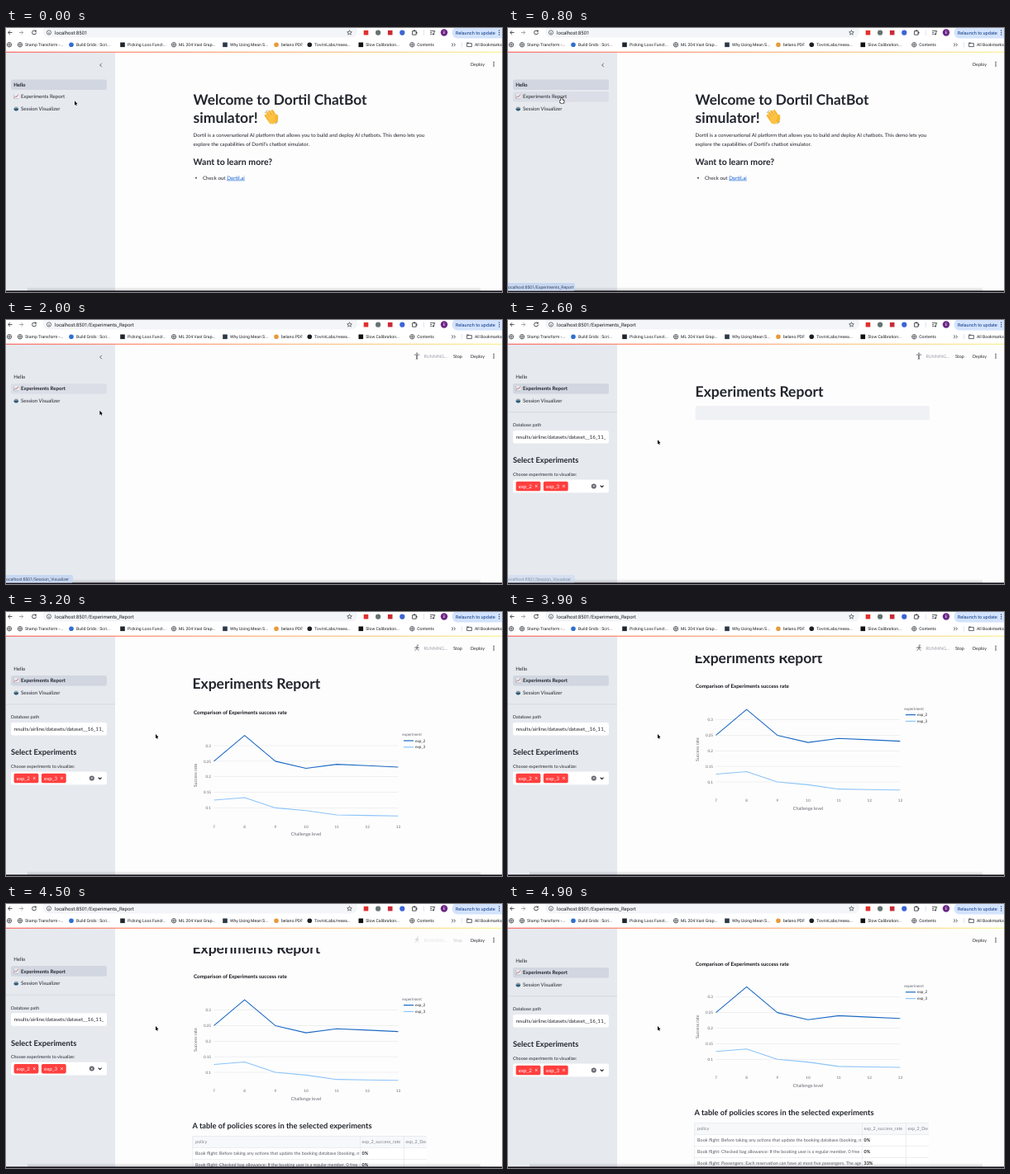
These frames come from a looping animation (600x320 px, 5000 ms). An HTML page with a canvas:

```html
<!DOCTYPE html>
<html lang="en">
<head>
<meta charset="utf-8">
<title>Chatbot simulator demo</title>
<style>
html, body { margin: 0; width: 100%; height: 100%; overflow: hidden; background: #fff; }
canvas { display: block; width: 600px; height: 320px; }
</style>
</head>
<body>
<canvas id="stage"></canvas>
<script>
const LOOP = 5000, STEP = 100;
const INK = '#23252e', DARK = '#3c4046', SOFT = '#62656f', SIDE = '#e6eaef';
const APP = 'Lato, "Open Sans", sans-serif';
const CHROME = 'Roboto, Inter, sans-serif';
const SIDE_W = 132;

const canvas = document.getElementById('stage');
const dpr = window.devicePixelRatio || 1;
canvas.width = 600 * dpr;
canvas.height = 320 * dpr;
const c = canvas.getContext('2d');
c.textRendering = 'geometricPrecision';
c.lineJoin = 'round';

// Smooth progress from 0 to 1 between two times
function ease(t, from, to) {
  const p = Math.min(1, Math.max(0, (t - from) / (to - from)));
  return p * p * (3 - 2 * p);
}

// Text is placed by the middle of its capitals
function text(s, x, cy, size, { color = INK, bold = false, font = APP, align = 'left' } = {}) {
  c.font = `${bold ? 700 : 400} ${size}px ${font}`;
  c.textAlign = align;
  c.fillStyle = color;
  c.fillText(s, x, cy + size * 0.36);
  return c.measureText(s).width;
}

function rect(x, y, w, h, color) {
  c.fillStyle = color;
  c.fillRect(x, y, w, h);
}

function pill(x, y, w, h, r, color) {
  c.beginPath();
  c.roundRect(x, y, w, h, r);
  c.fillStyle = color;
  c.fill();
}

function dot(x, y, r, color) {
  pill(x - r, y - r, 2 * r, 2 * r, r, color);
}

function stroke(color, width) {
  c.lineWidth = width;
  c.strokeStyle = color;
  c.stroke();
}

function ring(x, y, r, color, width = 0.8, end = Math.PI * 2) {
  c.beginPath();
  c.arc(x, y, r, 0, end);
  stroke(color, width);
}

function line(color, width, ...pts) {
  c.beginPath();
  pts.forEach(([x, y]) => c.lineTo(x, y));
  stroke(color, width);
}

function chevron(x, y, r, angle, color = DARK, width = 0.9) {
  const arm = a => [x - r * 1.4 * Math.cos(angle + a), y - r * 1.4 * Math.sin(angle + a)];
  line(color, width, arm(Math.PI / 4), [x, y], arm(-Math.PI / 4));
}

function cross(x, y, r, color) {
  line(color, 0.8, [x - r, y - r], [x + r, y + r]);
  line(color, 0.8, [x + r, y - r], [x - r, y + r]);
}

function clipped(x, y, w, h, draw) {
  c.save();
  c.beginPath();
  c.rect(x, y, w, h);
  c.clip();
  draw();
  c.restore();
}

function faded(alpha, draw) {
  c.save();
  c.globalAlpha = alpha;
  draw();
  c.restore();
}

function globe(x, y) {
  ring(x, y, 2.7, DARK);
  line(DARK, 0.7, [x - 2.6, y], [x + 2.6, y]);
  line(DARK, 0.7, [x, y - 2.6], [x, y + 2.6]);
}

function square(x, y, color) {
  rect(x - 2.8, y - 2.8, 5.6, 5.6, color);
}

function star(x, y, r) {
  c.beginPath();
  for (let i = 0; i < 10; i++) {
    const a = i * Math.PI / 5 - Math.PI / 2, q = i % 2 ? r * 0.45 : r;
    c.lineTo(x + q * Math.cos(a), y + q * Math.sin(a));
  }
  c.closePath();
  stroke(DARK, 0.7);
}

const bookmarks = [
  ['Stamp Transform -...', globe], ['Build Grids : Scri...', dot, '#2f6fd0'],
  ['Picking Loss Funct...', square, '#20262e'], ['ML 204 Vast Grap...', globe],
  ['Why Using Mean S...', square, '#2d3a48'], ['belano.PDF', dot, '#e79b3a'],
  ['TovrinLabs/resea...', dot, '#1c1f24'], ['Slow Calibration...', square, '#111'],
  ['Contents', globe]
];

function toolbar(clicked) {
  const ui = { font: CHROME, color: '#1d1f23' }, y = 5.5, row = 20.3;
  rect(0, 0, 600, 29, '#fff');
  line(DARK, 0.9, [7.5, y], [2.8, y]);
  chevron(2.7, y, 2.3, Math.PI);
  line('#9a9da2', 0.9, [16, y], [20.7, y]);
  chevron(20.8, y, 2.3, 0, '#9a9da2');
  ring(34, y, 2.4, DARK, 0.9, Math.PI * 1.7);
  rect(34.8, 2.7, 2, 1.8, DARK);

  pill(45, -3, 380, 14.5, 7, '#f3f5f9');
  ring(52, y, 2.6, DARK, 0.7);
  line(DARK, 0.8, [52, 5], [52, 7]);
  text('localhost:8501' + (clicked ? '/Experiments_Report' : ''), 59, 5.6, 6, ui);
  star(415.5, 5.7, 3);

  ['#e0312c', '#65736f', '#c92a35', '#3d63d6'].forEach((color, i) =>
    (i % 2 ? dot : square)(435.5 + i * 14.6, 5.7, i % 2 ? 3.1 : color, color));
  c.strokeStyle = DARK;
  c.lineWidth = 0.9;
  c.strokeRect(491.6, 3.6, 4.6, 4.6);
  dot(494, 3.2, 1, DARK);
  dot(496.6, 5.8, 1, DARK);
  [3.4, 5.4, 7.4].forEach((my, i) => line(DARK, 0.8, [513, my], [i ? 515.5 : 518.5, my]));
  dot(517, 7.4, 1, DARK);
  line(DARK, 0.8, [517.8, 7.4], [517.8, 4], [519.3, 4]);
  dot(530, y, 4.2, '#6b2687');
  text('E', 530, 5.6, 4.6, { font: CHROME, color: '#fff', align: 'center' });
  pill(539.5, -1, 66, 13.5, 6.5, '#d3e3fd');
  text('Relaunch to update', 543.8, 5.7, 5.6, { font: CHROME, color: '#0f3a86' });
  [3, 5.5, 8].forEach(dy => dot(596.7, dy, 0.7, '#24406f'));

  globe(4, row);
  let x = 23;
  bookmarks.forEach(([label, icon, color]) => {
    if (icon === dot) dot(x - 6, row, 2.8, color);
    else icon(x - 6, row, color);
    text(label, x, row + 0.1, 5.1, ui);
    x += label.length < 12 ? 40.3 : 62;
  });
  chevron(541, row, 1.8, 0);
  chevron(543.5, row, 1.8, 0);
  [[505, 2.5], [551, 17]].forEach(([sx, sy]) => rect(sx, sy, 0.6, 6.5, '#c9d4e8'));
  c.strokeStyle = DARK;
  c.lineWidth = 0.8;
  c.strokeRect(557.6, 18.6, 5.8, 4);
  rect(557.3, 17.6, 2.6, 1, DARK);
  text('All Bookmarks', 567, row + 0.1, 5.1, ui);
}

function rainbow() {
  const g = c.createLinearGradient(0, 0, 600, 0);
  g.addColorStop(0, '#ff5a55');
  g.addColorStop(1, '#f8f08a');
  rect(0, 28.7, 600, 1.1, g);
}

function bottomEdge() {
  const g = c.createLinearGradient(0, 314, 0, 318.5);
  g.addColorStop(0, 'rgba(0,0,0,0)');
  g.addColorStop(1, 'rgba(0,0,0,0.16)');
  rect(26, 314, 548, 4.5, g);
  rect(0, 318.4, 600, 1.6, '#14101a');
}

function chartIcon(x, y) {
  square(x, y, '#eef1f3');
  line('#8fa3ad', 0.5, [x - 2.7, y - 2.8], [x - 2.7, y + 2.7], [x + 2.8, y + 2.7]);
  line('#b9505a', 0.8, [x - 2.2, y + 1.6], [x - 0.6, y - 0.4], [x + 0.5, y + 0.6], [x + 2.5, y - 2.4]);
}

function bowlIcon(x, y) {
  rect(x - 2, y - 2, 4, 2, '#8b9ba4');
  c.beginPath();
  c.arc(x, y - 0.2, 2.9, 0, Math.PI);
  c.fillStyle = '#2f5875';
  c.fill();
}

function sidebar(s) {
  rect(0, 29, SIDE_W, 291, SIDE);
  c.save();
  c.translate(0, 1.8 * (ease(s.t, 4500, 4700) - ease(s.t, 4300, 4500)));
  if (!s.loaded) chevron(113.6, 45, 2.2, Math.PI, '#55585f');

  const rowY = i => 68.7 + 14.5 * i;
  const back = (i, color) => pill(6, rowY(i) - 6.3, 116, 12.6, 2.5, color);
  if (s.hover >= 0) back(s.hover, '#dbdee6');
  if (!s.clicked) back(0, '#d1d6e0');
  else if (s.loaded) back(1, '#d1d6e0');
  else back(1, '#dbdee6');
  text('Hello', 9.2, rowY(0), 6.1, { bold: !s.clicked });
  chartIcon(12.3, rowY(1) - 0.2);
  text('Experiments Report', 18, rowY(1), 6.12, { bold: s.clicked });
  bowlIcon(12.3, rowY(2));
  text('Session Visualizer', 18, rowY(2), 6.15);
  if (s.loaded) filters();
  c.restore();
}

function filters() {
  rect(0, 111.5, SIDE_W, 0.8, '#cfd4dc');
  text('Database path', 6, 127.4, 5.4);
  pill(6, 134, 116, 15.5, 2.5, '#fff');
  clipped(9, 134, 109.3, 16, () => text('results/airline/datasets/dataset__16_11_', 9.7, 141.7, 6.12));
  text('Select Experiments', 6, 170, 9.3, { bold: true });
  text('Choose experiments to visualize:', 6, 187, 5.4);
  pill(6, 193.5, 116, 15.7, 2.5, '#fff');
  ['exp_2', 'exp_3'].forEach((s, i) => {
    const x = 9.6 + 33.3 * i;
    pill(x, 195.8, 29.8, 11.4, 1.8, '#ff3f3f');
    text(s, x + 3.2, 201.4, 6.1, { color: '#fff' });
    cross(x + 24.6, 201.4, 1.3, '#fff');
  });
  dot(103.8, 201.4, 3, '#60636b');
  cross(103.8, 201.4, 1.1, '#fff');
  chevron(113.6, 202.5, 2, Math.PI / 2, INK, 1.1);
}

function wave(x, y) {
  c.save();
  c.translate(x, y);
  c.rotate(-0.6);
  for (let i = 0; i < 4; i++) pill(-6 + 3.2 * i, -8.6 + 0.7 * (i - 1.5) ** 2, 2.9, 13, 1.4, '#f7b62f');
  pill(-6, -1.5, 12.6, 10, 5, '#fcc343');
  c.rotate(0.75);
  pill(4.6, -4, 3.3, 10, 1.6, '#f7b62f');
  c.restore();
  [0, Math.PI].forEach(a => {
    c.beginPath();
    c.arc(x, y, 9.4, a + 0.55, a + 1.1);
    stroke('#8fa3ad', 0.8);
  });
}

function welcome() {
  const x = 226.6, body = 6.16, blue = '#0b5cd8';
  text('Welcome to Dortil ChatBot', x, 87, 17.3, { bold: true });
  text('simulator!', x, 108.3, 17.6, { bold: true });
  wave(321, 108);
  text('Dortil is a conversational AI platform that allows you to build and deploy AI chatbots. This demo lets you', x, 130, body);
  text("explore the capabilities of Dortil's chatbot simulator.", x, 140.3, body);
  text('Want to learn more?', x, 162, 10.55, { bold: true });
  dot(230, 181.7, 0.9, INK);
  const at = 238 + text('Check out ', 238, 181.6, body);
  const w = text('Dortil.ai', at, 181.6, body, { color: blue });
  rect(at, 184.6, w, 0.6, blue);
}

const series = [
  ['exp_2', '#1c69c4', [0.25, 0.333, 0.25, 0.227, 0.24, 0.2355, 0.231]],
  ['exp_3', '#8cc4fa', [0.125, 0.133, 0.1, 0.091, 0.077, 0.0755, 0.074]]
];

function chart() {
  const px = i => 251.5 + i * 37.15;
  const py = v => 237.4 - (v - 0.1) * 377;
  const mid = { color: SOFT, align: 'center' };
  text('Comparison of Experiments success rate', 227, 121.6, 6.3, { bold: true, color: '#111318' });
  for (let i = 0; i < 5; i++) {
    const v = (10 + 5 * i) / 100;
    rect(px(0), py(v) - 0.3, px(6) - px(0), 0.6, '#e4e6ea');
    text(String(v), 248, py(v), 4.6, { color: SOFT, align: 'right' });
  }
  for (let i = 0; i < 7; i++) text(String(7 + i), px(i), 260, 4.6, mid);
  text('Challenge level', 363, 269.3, 5.5, mid);
  c.save();
  c.translate(229.3, 198);
  c.rotate(-Math.PI / 2);
  text('Success rate', 0, 0, 5.3, mid);
  c.restore();

  text('experiment', 479.3, 148.5, 4.75, { color: SOFT });
  series.forEach(([name, color, data], i) => {
    line(color, 1.1, ...data.map((v, j) => [px(j), py(v)]));
    const y = 156 + i * 7.8;
    line(color, 1.2, [481, y], [493, y]);
    text(name, 495, y, 4.7);
  });
}

const policies = [
  ['Book flight: Before taking any actions that update the booking database (booking, more', '0%'],
  ['Book flight: Checked bag allowance: If the booking user is a regular member, 0 free checked', '0%'],
  ['Book flight: Passengers: Each reservation can have at most five passengers. The agent needs', '33%']
];

function table() {
  const cols = [225.5, 428, 481, 509], top = 314.7, rowH = 13.85, edge = '#e1e3e8';
  const width = cols[3] - cols[0];
  text('A table of policies scores in the selected experiments', cols[0], 302.2, 9.28, { bold: true });
  rect(cols[0], top, width, 60, '#fff');
  rect(cols[0], top, width, rowH, '#f7f8fa');
  const row = (r, cells, styles) => {
    const y = top + rowH * r;
    cells.forEach((s, i) => clipped(cols[i], y, cols[i + 1] - cols[i] - 0.8, rowH, () =>
      text(s, cols[i] + (i ? 2.5 : 3.6), y + rowH / 2, 5.45, styles[i])));
    rect(cols[0], y, width, 0.6, edge);
  };
  const head = { color: '#7d808a' };
  row(0, ['policy', 'exp_2_success_rate', 'exp_2_Decisions'], [head, head, head]);
  policies.forEach((cells, i) => row(i + 1, cells, [{ color: '#565963' }, { bold: true }]));
  cols.slice(0, 3).forEach(x => rect(x, top, 0.6, 60, edge));
}

// Stick figure whose limbs spread with its stride
function runner(x, y, stride) {
  const ink = '#6d7078';
  const limb = (ly, len, a) => line(ink, 0.9, [x, y + ly], [x + len * Math.sin(a), y + ly + len * Math.cos(a)]);
  dot(x + stride, y - 3.4, 0.9, ink);
  line(ink, 1.6, [x + stride * 0.5, y - 1.8], [x, y + 1]);
  [-1, 1].forEach(side => {
    limb(-1.6, 3.3, side * (1.57 - 0.5 * stride));
    limb(0.8, 3.4, side * (0.25 + 0.6 * stride));
  });
}

function header(t) {
  const y = 43.7, alpha = t < 1200 ? 0 : 1 - ease(t, 4300, 4600);
  text('Deploy', 562, y, 5.4);
  [-2.2, 0, 2.2].forEach(dy => dot(590, y + dy, 0.75, INK));
  faded(alpha, () => {
    runner(497, y, ease(t, 2700, 2800));
    text('RUNNING...', 505.5, y, 5.3, { color: '#9c9fa8' });
    text('Stop', 541, y, 5.4);
  });
}

function main({ t, clicked, loaded }) {
  const charted = t >= 2900;
  const scroll = 31.4 * ease(t, 3400, 3900) + 2 * ease(t, 4300, 4500) + 15.8 * ease(t, 4500, 4900);
  rect(SIDE_W, 29, 600 - SIDE_W, 291, '#fdfdfd');
  clipped(SIDE_W, 53, 600 - SIDE_W, 267, () => {
    c.translate(0, -scroll);
    if (t < 1200) faded(clicked ? 0.4 : 1, welcome);
    if (loaded) text('Experiments Report', charted ? 225.4 : 226.6, 87, 17.55, { bold: true });
    if (charted) chart();
    else if (loaded) pill(226.7, 104, 283.3, 17.3, 2.5, '#f0f1f5');
    if (t >= 4200) table();
  });
  header(t);
}

function status({ t, pointer }) {
  if (t < 500) return;
  const page = pointer.y < 91 ? 'Experiments_Report' : 'Session_Visualizer';
  faded(1 - ease(t, 2400, 2800), () => {
    pill(-4, 309, 85, 9.6, 2, '#c8d8f2');
    text('localhost:8501/' + page, -1.2, 313.8, 5.05, { font: CHROME, color: '#33435f' });
  });
}

function pointerAt(t) {
  const reach = ease(t, 0, 400), leave = ease(t, 1600, 2500);
  return {
    x: 83 - 18 * reach + 116 * leave,
    y: 88.3 - 4 * reach + 61 * leave + 2.7 * ease(t, 2600, 2900)
  };
}

function cursor({ pointer, hover }) {
  c.save();
  c.translate(pointer.x, pointer.y);
  if (hover >= 0) {
    const hand = grow => {
      const color = grow ? '#111' : '#fff';
      pill(-0.8 - grow, 0.4 - grow, 1.5 + 2 * grow, 5 + 2 * grow, 1, color);
      pill(-1.9 - grow, 3.1 - grow, 4.6 + 2 * grow, 3.6 + 2 * grow, 1.4, color);
    };
    hand(0.6);
    hand(0);
  } else {
    c.beginPath();
    [[0, 0], [0, 5.2], [1.2, 4.2], [2, 5.9], [2.8, 5.5], [2, 3.9], [3.5, 3.7]].forEach(p => c.lineTo(...p));
    c.closePath();
    stroke('#fff', 0.8);
    c.fillStyle = '#000';
    c.fill();
  }
  c.restore();
}

function draw(t) {
  const pointer = pointerAt(t);
  const row = pointer.y < 90 ? 1 : 2;
  const hover = t >= 100 && pointer.y < 104 ? row : -1;
  const state = { t, pointer, hover, clicked: t >= 1000, loaded: t >= 2300 };
  c.setTransform(dpr, 0, 0, dpr, 0, 0);
  main(state);
  sidebar(state);
  toolbar(state.clicked);
  rainbow();
  bottomEdge();
  status(state);
  cursor(state);
}

const start = performance.now();
function frame() {
  const t = (performance.now() - start) % LOOP;
  draw(Math.floor(t / STEP) * STEP);
  requestAnimationFrame(frame);
}
frame();
</script>
</body>
</html>
```
